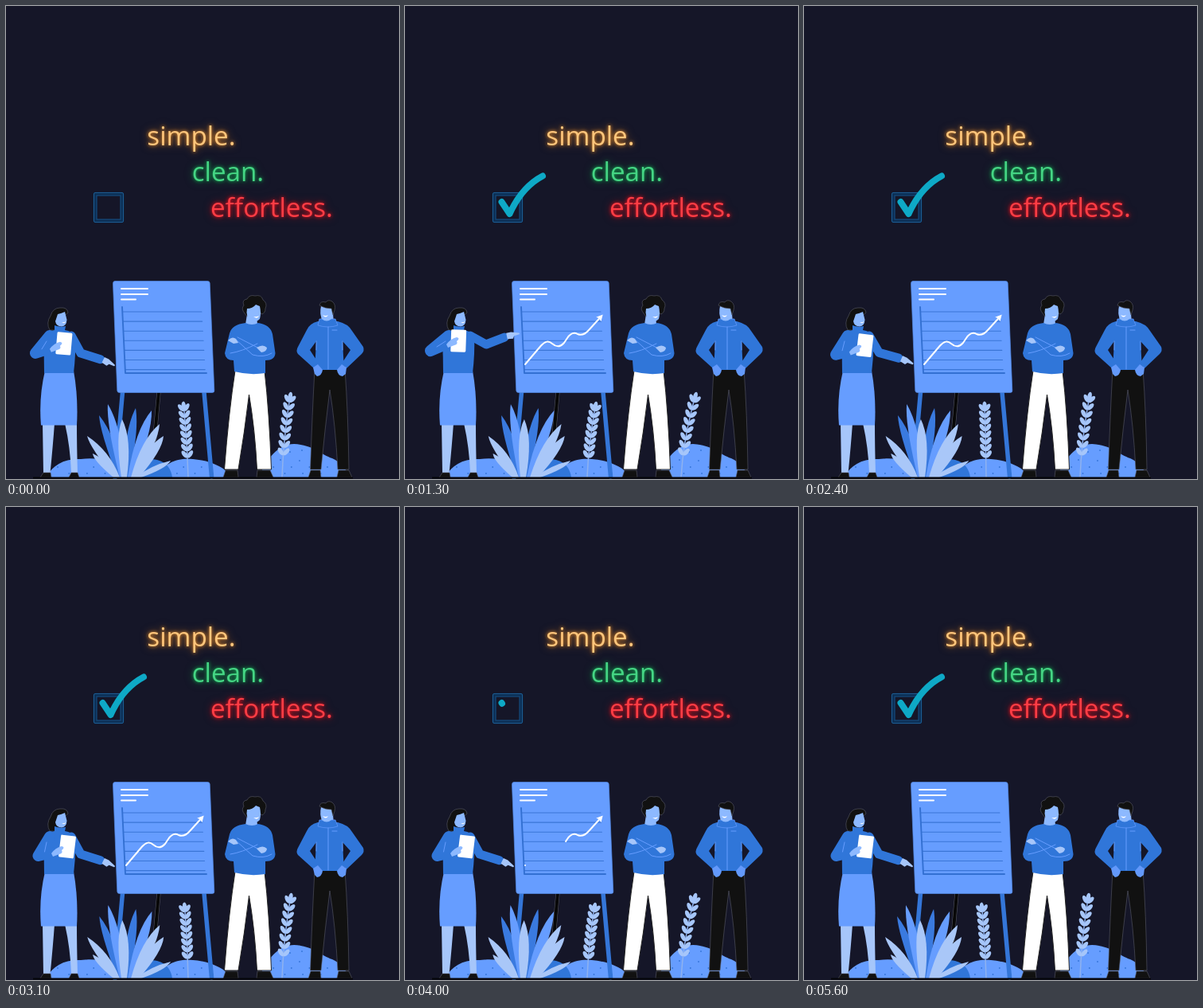
Animation, 494 px wide and 594 px high, one loop 5700 ms. Source, as an HTML page:

```html
<!DOCTYPE html>
<html lang="en">
<head>
<meta charset="utf-8">
<title>simple. clean. effortless.</title>
<style>
  html, body { margin: 0; width: 100%; height: 100%; overflow: hidden; background: #151628; }
  svg { display: block; width: 100vw; height: 100vh; }
  text { font: 33.2px "Open Sans", "Noto Sans", sans-serif; }
  .glow1 { fill: #ffc67c; filter: drop-shadow(0 0 2px #e8902c) drop-shadow(0 0 5px #b8681a90); }
  .glow2 { fill: #45d584; filter: drop-shadow(0 0 2px #13a850) drop-shadow(0 0 5px #0c7c3c90); }
  .glow3 { fill: #ff3d45; filter: drop-shadow(0 0 2px #e3101c) drop-shadow(0 0 5px #a80c1890); }
  .line { fill: none; stroke-linecap: round; stroke-linejoin: round; }
  .black { fill: #111; stroke: #5a5c68; stroke-width: .6; }
  .cloth { fill: #3076d9; }
  .mid { fill: #669dff; }
  .light { fill: #a6c6fa; }
  .skin { fill: #8db9ff; }
  .fold { fill: none; stroke: #669dff; stroke-width: 1; stroke-linecap: round; }
</style>
</head>
<body>
<svg viewBox="0 0 494 594" preserveAspectRatio="none">
  <rect width="494" height="594" fill="#151628"/>

  <text class="glow1" x="177.3" y="175">simple.</text>
  <text class="glow2" x="233.7" y="220">clean.</text>
  <text class="glow3" x="257" y="265">effortless.</text>

  <g fill="none">
    <rect x="112" y="236" width="34" height="34" rx="1" stroke="#0c2f55" stroke-width="4.6"/>
    <rect x="110.5" y="234.5" width="37" height="37" rx="1.5" stroke="#1c5c92" stroke-width="1"/>
    <rect x="114" y="238" width="30" height="30" stroke="#174f82" stroke-width="1"/>
  </g>
  <path id="check" class="line" d="M121.5 246 L131.5 261 C141 240 155 223 173 213.5" stroke="#0ea9c6" stroke-width="8"/>

  <g id="hills">
    <path class="mid" d="M51 592 C58 576 74 568 94 569 C120 566 140 574 160 580 L178 592Z"/>
    <path class="mid" d="M188 592 C199 573 216 567 235 569 C258 571 275 579 285 592Z"/>
    <path class="mid" d="M318 592 C327 568 343 550 362 550 C386 551 397 564 410 568 C421 573 428 582 432 592Z"/>
    <path class="cloth" d="M162 592 C164 574 178 567 190 570 C203 573 208 583 209 592Z"/>
    <g id="dots" fill="#3474d8"></g>
  </g>

  <g class="line">
    <path d="M146.500 485 L137 592" stroke="#3476d8" stroke-width="5.500"/>
    <path d="M192 485 L185 563" stroke="#5a5c68" stroke-width="5" stroke-linecap="butt"/>
    <path d="M192 485 L185 563" stroke="#080808" stroke-width="4" stroke-linecap="butt"/>
    <path d="M249 485 L258.500 591" stroke="#3476d8" stroke-width="5.500"/>
  </g>

  <path d="M137 345.500 H253.500 Q256 345.500 256.200 348 L261.800 483 Q262 485.500 259 485.500 H142.500 Q140 485.500 139.800 483 L134.500 348.500 Q134.500 345.500 137 345.500Z" fill="#669dff" stroke="#5489e4" stroke-width=".7"/>
  <path class="line" d="M145 355 H178 M145 362 H178 M145 368.500 H163" stroke="#fff" stroke-width="2"/>
  <path id="rules" class="line" stroke="#3a75d6" stroke-width="1.100"/>
  <path class="line" d="M146 378 L150 461 H252" stroke="#3370d2" stroke-width="1.900"/>
  <path id="trend" class="line" d="M151 450 L171 426.500 Q178.500 418 185 424 Q193 431 200 423 L204 417 Q210 408 217 412 Q224 415 231 407 L246 390.500" stroke="#fff" stroke-width="2"/>
  <path id="arrow" d="M4 0 L-4 -4.200 L-2.500 0 L-4 4.200Z" fill="#fff"/>

  <!-- woman -->
  <g>
    <path class="light" d="M46 524 H61 Q59 552 55.500 587 H47Z M74 524 H89 Q89 552 90 587 H82Q81 555 74 524Z"/>
    <path class="black" d="M47 586 H56 L57 592 H43Z M82 586 H90 L92 592 H79Z"/>
    <path class="mid" d="M49 458 H85 Q91 492 89 526.500 H44 Q41 492 49 458Z"/>
    <path class="black" d="M55 407 Q50 398 56 389 Q59 379 68 379 Q77 378 78 385 Q74 390 70 390 Q69 402 62 407Z"/>
    <path class="cloth" d="M61 401 Q68 404 75 402 L74 407 Q83 408 87 415 Q88 436 85 461 H48 Q48 442 47 420 Q48 409 61 407Z"/>
    <path class="skin" d="M65 387 Q70 386 74 384 L76.500 394 Q76 402 70 402.500 Q63 402 62 396Z"/>
    <path d="M70 397 Q73 398 75 396 Q74 400 70 397Z" fill="#fff"/>
    <path id="farArm" class="line" stroke="#3076d9" stroke-width="11"/>
    <path id="pointer" class="light" d="M-1 -4 L5 -4 L15 -1 Q16 1 14 1 L8 1.500 L6 4.500 L-1 3.500Z"/>
    <path id="nearArm" class="line" stroke="#3076d9" stroke-width="14"/>
    <path id="armFold" class="fold"/>
    <rect id="sheet" x="-9.500" y="-14" width="19" height="28" rx="1.500" fill="#fff"/>
    <path id="grip" class="skin" d="M-5 4 Q0 -3 8 -5 Q13 -4 8 0 Q10 4 5 5 L-3 8Z"/>
  </g>

  <!-- man with crossed arms -->
  <g>
    <path d="M288 458 H325 Q331 510 333.500 582 H315.500 Q313 532 305.500 488 Q300 535 292 582 H274.500 Q280 510 288 458Z" fill="#fff" stroke="#222" stroke-width="1"/>
    <path class="black" d="M276 583 H291 L292 592 H273Z M316 583 H332 L336 592 H315Z"/>
    <path class="skin" d="M303 387 H315 L316 400 Q309 404 301 400Z"/>
    <path class="cloth" d="M301 398 Q309 402 317 398 Q332 400 335 412 L338.500 436 Q338 445 326 445 L326 461 Q306 464 287 459 L286 445 Q276 445 275 436 L281 411 Q284 400 301 398Z"/>
    <path class="black" d="M300 386 Q295 380 299 376 Q296 369 303 368 Q306 362 313 364 Q321 362 323 369 Q329 373 326 380 Q326 386 321 387 L316 378 L304 384 L303 390Z"/>
    <path class="skin" d="M303 380 Q310 380 314 375 L319 377 Q321 386 319 393 Q315 398 308 395 Q301 390 303 380Z"/>
    <path d="M311 390 Q315 391 318 389 Q316 394 311 390Z" fill="#fff"/>
    <path class="fold" d="M288 418 L310 438 Q324 442 334 436 M282 436 Q296 434 316 424 M291 416 L324 433"/>
    <path class="light" d="M279 420 Q284 414 289 418 L292 423 L286 424Z M315 429 Q323 424 328 429 Q328 434 321 435Z"/>
  </g>

  <!-- man with hands on hips -->
  <g>
    <path class="black" d="M388 456 H426 Q430 510 431 582 H417 Q414 525 407 482 Q401 530 396 582 H382.500 Q385 510 388 456Z"/>
    <path class="black" d="M383 583 H395 L396 592 H380Z M418 583 H431 L435 592 H416Z"/>
    <path class="skin" d="M397 386 H411 L412 398 H396Z"/>
    <path class="cloth" d="M392 396 H417 Q430 399 435 408 L449 428 Q451 433 447 437 L428 455 L422 449 L433 432 L423 421 L425 457 H388 L390 421 L382 432 L393 449 L387 455 L367 437 Q364 433 367 428 L378 407 Q381 399 392 396Z"/>
    <path class="cloth" d="M394 393 H414 L417 401 Q405 405 392 401Z" stroke="#669dff" stroke-width=".7"/>
    <path class="fold" d="M405 403 V456 M390 421 V432 M423 421 V432 M410 407 H416"/>
    <path d="M386 454 L392 450 L398 457 Q397 464 391 465 L388 462Z M428 454 L422 450 L416 457 Q417 464 423 465 L427 462Z" fill="#6399fb"/>
    <path class="skin" d="M396 377 L410 375 Q412 388 409 393 Q403 398 397 393 Q394 386 396 377Z"/>
    <path class="black" d="M394 376 Q395 370 402 372 Q405 368 410 371 Q415 375 413 382 L411 388 L409 380 Q401 380 394 376Z"/>
    <path d="M398 388 Q402 390 405 388 Q402 393 398 388Z" fill="#fff"/>
  </g>

  <g id="bush"></g>
  <g id="sprigs"></g>
  <path d="M34 592.500 H436" stroke="#050508" stroke-width="2"/>
</svg>
<script>
const LOOP = 5700;
const $ = id => document.getElementById(id);
const set = (el, name, value) => el.setAttribute(name, value);
const lerp = (a, b, k) => a + (b - a) * k;
const mix = (a, b, k) => a.map((v, i) => lerp(v, b[i], k));
const clamp = k => Math.min(1, Math.max(0, k));
const ramp = (t, from, to) => clamp((t - from) / (to - from));
const ease = k => k * k * (3 - 2 * k);

function add(parent, tag, attrs) {
  const el = document.createElementNS("http://www.w3.org/2000/svg", tag);
  for (const name in attrs) set(el, name, attrs[name]);
  return parent.appendChild(el);
}

set($("rules"), "d", [...Array(7)].map((_, i) => {
  const y = 384 + i * 12.1;
  return `M${146.5 + i * .55} ${y} H${246 + i * .7}`;
}).join(" "));

for (let i = 0; i < 32; i++) {
  const row = i % 2;
  add($("dots"), "circle", { cx: 65 + i * 11.3 + row * 3, cy: 579 + row * 8, r: .9 });
}
[[345, 570], [357, 560], [372, 558], [369, 571], [385, 567], [392, 575]]
  .forEach(([cx, cy]) => add($("dots"), "circle", { cx, cy, r: .9 }));
// Keep dots off the gap between the hills.
[...$("dots").children].forEach(dot => {
  const x = +dot.getAttribute("cx");
  if (x > 268 && x < 334 || x > 422) dot.remove();
});

// Leaves: tip x, tip y, base x, width, colour
const DARK = "#3a7adf", MID = "#669dff", PALE = "#a9c7f8";
const leaves = [
  [117, 514, 143, 12, DARK], [128, 500, 146, 12, MID], [163, 505, 150, 11, DARK],
  [183, 508, 156, 13, MID], [102, 540, 139, 15, PALE], [193, 525, 160, 13, PALE],
  [146, 519, 148, 13, PALE], [198, 540, 163, 14, PALE], [109, 562, 138, 15, PALE],
  [207, 571, 166, 12, PALE]
].map(([x, y, base, width, fill]) => ({ x, y, base, width, el: add($("bush"), "path", { fill }) }));

function drawLeaf({ x, y, base, width, el }, sway) {
  const tip = x + sway * 5 * (592 - y) / 92;
  const midX = lerp(base, tip, .6), midY = lerp(592, y, .72);
  set(el, "d", `M${base - 3} 592 Q${midX - width * .75} ${midY} ${tip} ${y}
    Q${midX + width * .9} ${midY + 4} ${base + 4} 592Z`);
}

function makeSprig(base, tip, top, reach) {
  const stem = add($("sprigs"), "path", { class: "line", stroke: "#8fb2ef", "stroke-width": 1.5 });
  const buds = [...Array(17)].map(() => add($("sprigs"), "ellipse", { rx: 5.4, ry: 2.7, class: "light" }));
  return { base, tip, top, reach, stem, buds };
}
const sprigs = [makeSprig(229, 223.3, 502, 16.5), makeSprig(347, 357.3, 490, 7.8)];

function drawSprig({ base, tip, top, reach, stem, buds }, sway) {
  const lean = tip + sway * reach - base;
  const height = 592 - top;
  const at = u => [base + lean * (.35 * u + .65 * u * u), 592 - height * u];
  const [cx] = at(.5), [ex] = at(1);
  set(stem, "d", `M${base} 592 Q${2 * cx - (base + ex) / 2} ${592 - height / 2} ${ex} ${top}`);
  buds.forEach((bud, i) => {
    const pair = Math.floor(i / 2), last = i === 16;
    const u = last ? 1 : .27 + pair * .093;
    const [x, y] = at(u), side = i % 2 ? 1 : -1;
    const tilt = Math.atan2(lean * (.35 + 1.3 * u), height) * 180 / Math.PI;
    const turn = tilt - 90 + (last ? 0 : side * 36);
    set(bud, "transform", `translate(${x} ${y}) rotate(${turn}) translate(${last ? 0 : 6} 0)`);
  });
}

function drawWoman(t) {
  const near = t < 1500 ? lerp(.42, 1, ease(ramp(t, 0, 400))) : 1 - ease(ramp(t, 1920, 2480));
  const far = t < 1500 ? ease(ramp(t, 50, 550)) : 1 - ease(ramp(t, 1920, 2480));

  const elbow = mix([40.5, 438], [32, 433], near);
  const wrist = mix([58, 434], [53, 424], near);
  set($("nearArm"), "d", `M55 414 L${elbow} L${wrist}`);
  set($("armFold"), "d", `M51 421 L${elbow[0] + 8} ${elbow[1] - 5}`);
  const sheet = mix([77, 426.5], [67.2, 420.5], near);
  set($("sheet"), "transform", `translate(${sheet}) rotate(${lerp(7, 2, near)})`);
  set($("grip"), "transform", `translate(${wrist[0] + 4} ${wrist[1] - 3})`);

  const farElbow = mix([94, 436], [102, 425], far);
  const hand = mix([123, 445], [129, 414.5], far);
  set($("farArm"), "d", `M82 414 L${farElbow} L${mix(hand, farElbow, .15)}`);
  set($("pointer"), "transform", `translate(${hand}) rotate(${lerp(26, -12, far)})`);
}

const trendLength = $("trend").getTotalLength();
function drawTrend(t) {
  const head = trendLength * ease(ramp(t, 200, 1250));
  const tail = trendLength * ease(ramp(t, 3500, 4450));
  const visible = head - tail > .5;
  for (const id of ["trend", "arrow"]) $(id).style.display = visible ? "" : "none";
  if (!visible) return;
  set($("trend"), "stroke-dasharray", `0 ${tail} ${head - tail} ${trendLength * 2}`);
  const p = $("trend").getPointAtLength(head), q = $("trend").getPointAtLength(Math.max(0, head - 2));
  const turn = Math.atan2(p.y - q.y, p.x - q.x) * 180 / Math.PI;
  set($("arrow"), "transform", `translate(${p.x} ${p.y}) rotate(${turn})`);
}

const checkLength = $("check").getTotalLength();
function drawCheck(t) {
  const phase = t % 3385;
  const length = checkLength * ramp(phase, 610, 1180);
  $("check").style.display = length > 0 ? "" : "none";
  set($("check"), "stroke-dasharray", `${length} ${checkLength * 2}`);
}

function draw(t) {
  const sway = (1 - Math.cos(t / LOOP * 4 * Math.PI)) / 2;
  leaves.forEach(leaf => drawLeaf(leaf, sway));
  sprigs.forEach(sprig => drawSprig(sprig, sway));
  drawWoman(t);
  drawTrend(t);
  drawCheck(t);
}

const start = performance.now();
function frame() {
  draw((performance.now() - start) % LOOP);
  requestAnimationFrame(frame);
}
frame();
</script>
</body>
</html>
```
